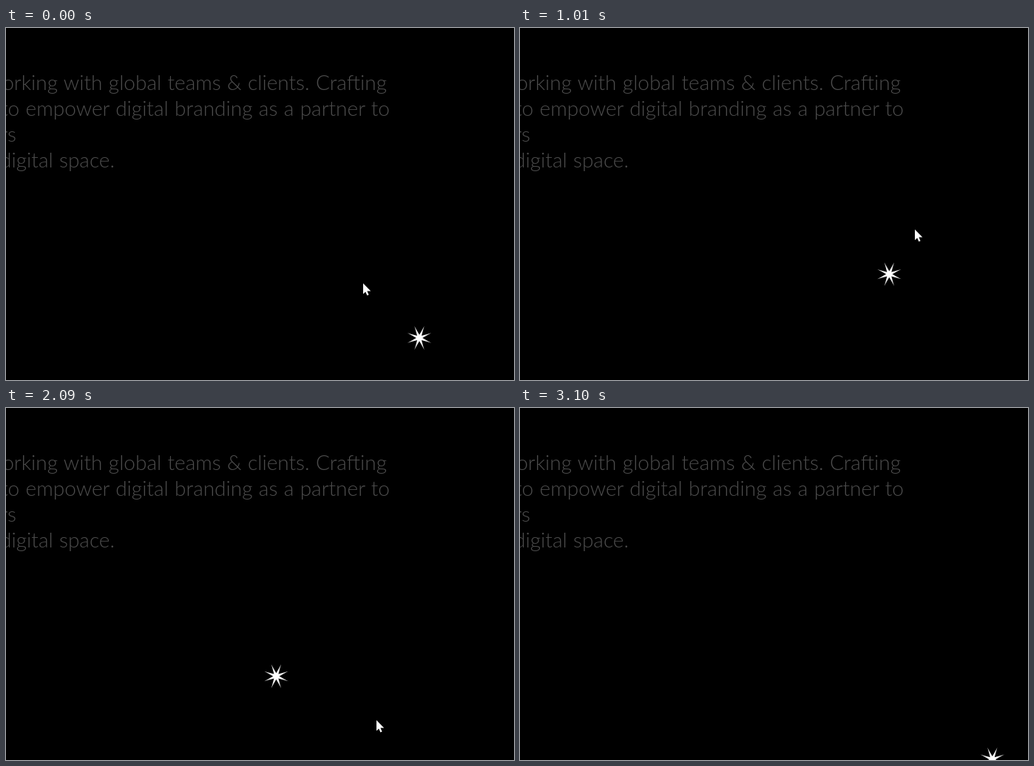
These frames come from a looping animation (687 by 477 pixels, 3180 ms). An HTML page:

```html
<!DOCTYPE html>
<html lang="en">
<head>
<meta charset="utf-8">
<title>Star following the pointer</title>
<style>
html, body { margin: 0; width: 100%; height: 100%; overflow: hidden; background: #000; }
svg { display: block; width: 687px; height: 477px; }
text { font: 300 28px Lato, "Open Sans", sans-serif; word-spacing: .8px; text-anchor: end; fill: url(#glow); }
</style>
</head>
<body>
<svg viewBox="0 0 687 477">
  <defs>
    <radialGradient id="glow" gradientUnits="userSpaceOnUse" r="215">
      <stop offset="0" stop-color="#e4e4e4"/>
      <stop offset="1" stop-color="#4c4c4c"/>
    </radialGradient>
    <radialGradient id="shine" gradientUnits="userSpaceOnUse" cx="0" cy="0" r="17.5">
      <stop offset=".3" stop-color="#fff"/>
      <stop offset="1" stop-color="#b4b4b4"/>
    </radialGradient>
  </defs>
  <text x="515" y="84">orking with global teams &amp; clients. Crafting</text>
  <text x="519" y="119">to empower digital branding as a partner to</text>
  <text x="14" y="154">rs</text>
  <text x="147" y="189">digital space.</text>
  <polygon id="star" fill="url(#shine)"/>
  <polygon id="pointer" fill="#fff" points="0,0 0,14.5 3.2,11.4 5.4,16.4 7.6,15.4 5.4,10.5 10.3,10.5"/>
</svg>
<script>
const LOOP = 3180;
const LAG = 175;  // time constant of the star's pursuit, ms
const STEP = 5;   // integration step, ms

// Turning points of the pointer: time in ms, x, y
const keys = [
  [0, 483, 346], [200, 445, 282], [400, 389, 285], [590, 361, 305],
  [760, 440, 376], [890, 549, 360], [1010, 534, 273], [1090, 505, 203],
  [1230, 400, 158], [1400, 346, 149], [1650, 302, 115], [1780, 262, 329],
  [1960, 340, 398], [2170, 600, 434], [2250, 634, 440], [2400, 640, 477]
];

const $ = id => document.getElementById(id);

$("star").setAttribute("points", Array.from({ length: 16 }, (_, i) => {
  const r = i % 2 ? 4.2 : 17.5, a = (i + 1) * Math.PI / 8;
  return `${(r * Math.cos(a)).toFixed(2)},${(r * Math.sin(a)).toFixed(2)}`;
}).join(" "));

// Pointer position: a smooth curve through the keys
function pointerAt(t) {
  const last = keys.length - 1;
  if (t >= keys[last][0]) return keys[last].slice(1);
  const i = keys.findIndex(k => k[0] > t) - 1;
  const a = keys[i], b = keys[i + 1], span = b[0] - a[0], u = (t - a[0]) / span;
  const slope = (j, d) => {
    const p = keys[Math.max(j - 1, 0)], n = keys[Math.min(j + 1, last)];
    return (n[d] - p[d]) / (n[0] - p[0]) * span;
  };
  return [1, 2].map(d => {
    const m = slope(i, d), n = slope(i + 1, d), rise = b[d] - a[d];
    return a[d] + u * (m + u * (3 * rise - 2 * m - n + u * (m + n - 2 * rise)));
  });
}

// Star position: it closes a fixed share of its distance to the pointer per step
const pull = 1 - Math.exp(-STEP / LAG);
const trail = [[559, 420]];
for (let t = STEP / 2; t < LOOP; t += STEP) {
  const target = pointerAt(t), star = trail[trail.length - 1];
  trail.push(star.map((v, d) => v + (target[d] - v) * pull));
}
const starAt = t => trail[Math.round(t / STEP)];

// The motion ticks at about 15 steps a second, then at 13, on a 10 ms clock
function tick(t) {
  const [from, step] = t < 550 ? [0, 66.6] : [550, 76.6];
  return Math.ceil((from + Math.floor((t - from) / step) * step) / 10) * 10;
}

function draw(now) {
  const t = tick(now % LOOP);
  const [x, y] = starAt(t);
  $("star").setAttribute("transform", `translate(${x} ${y})`);
  $("glow").setAttribute("cx", x);
  $("glow").setAttribute("cy", y);
  $("pointer").setAttribute("transform", `translate(${pointerAt(t).map(Math.round)})`);
}

const start = performance.now();
function frame() {
  draw(performance.now() - start);
  requestAnimationFrame(frame);
}
frame();
</script>
</body>
</html>
```
